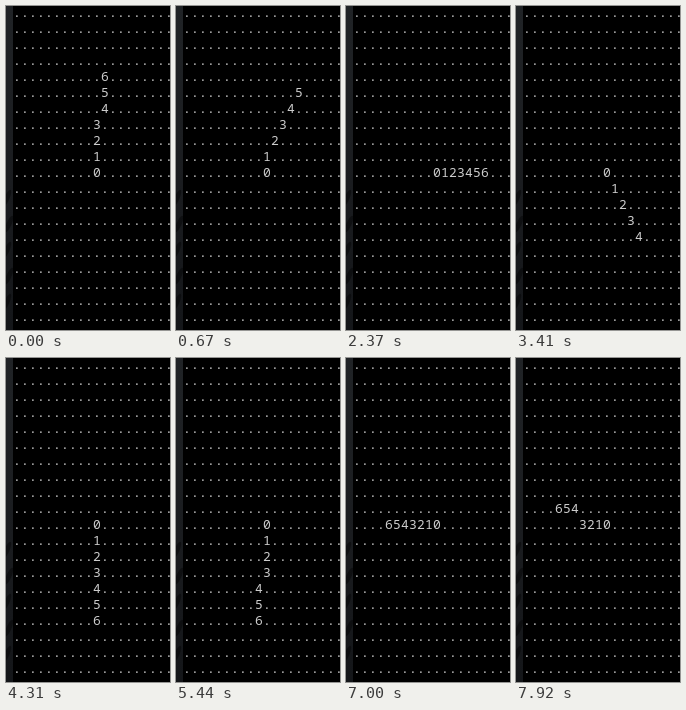
An HTML page with a canvas that plays this animation: 164 px wide and 324 px high, repeating every 8000 ms.

```html
<!DOCTYPE html>
<html lang="en">
<head>
<meta charset="utf-8">
<title>Rotating digit line</title>
<style>
  html, body { margin: 0; width: 100%; height: 100%; overflow: hidden; background: #000; }
  canvas { display: block; }
</style>
</head>
<body>
<canvas id="stage" width="164" height="324"></canvas>
<script>
const ctx = document.getElementById('stage').getContext('2d');
const LOOP = 8000;
const CELL_W = 8, CELL_H = 16, LEFT = 7, BASE = 11;
const COLS = 20, ROWS = 20, CENTER = 10;
const RADIUS = 7.38;
const BLINK = 139.8;

// The line's angle in degrees, clockwise from the right: [ms, angle]
const SWEEP = [
  [0, -72], [1700, -11.7], [2440, 11.7], [3410, 42], [4310, 78.4],
  [5290, 101.8], [6160, 138.5], [7000, 168.4], [LOOP, 194]
];

function angleAt(t) {
  const i = SWEEP.findIndex(([time]) => time > t);
  const [t0, a0] = SWEEP[i - 1], [t1, a1] = SWEEP[i];
  return (a0 + (a1 - a0) * (t - t0) / (t1 - t0)) * Math.PI / 180;
}

// Digits step along the longer axis and stop one cell before the end point
function digitCells(angle) {
  const dx = Math.round(RADIUS * Math.cos(angle));
  const dy = Math.round(RADIUS * Math.sin(angle));
  const n = Math.max(Math.abs(dx), Math.abs(dy));
  const cells = new Map();
  for (let i = 0; i < n; i++) {
    const col = CENTER + Math.trunc(dx * i / n);
    const row = CENTER + Math.trunc(dy * i / n);
    cells.set(row * COLS + col, i);
  }
  return cells;
}

function drawBackdrop() {
  ctx.fillStyle = '#000';
  ctx.fillRect(0, 0, 164, 324);
  const side = ctx.createLinearGradient(0, 0, 0, 324);
  side.addColorStop(0, '#202326');
  side.addColorStop(0.55, '#1a1c1f');
  side.addColorStop(1, '#141619');
  ctx.fillStyle = side;
  ctx.fillRect(0, 0, LEFT, 324);
  // Dark slanted smudges low on the side strip
  ctx.fillStyle = 'rgba(0, 0, 0, 0.4)';
  for (let i = 0; i < 5; i++) {
    ctx.beginPath();
    ctx.ellipse(1 + i % 2 * 2, 192 + i * 26, 2.5, 9, 0.4, 0, 2 * Math.PI);
    ctx.fill();
  }
}

function drawCursor() {
  ctx.fillStyle = '#f2f2f2';
  ctx.fillRect(LEFT, 26, CELL_W, 4);
  ctx.fillStyle = '#303030';
  ctx.fillRect(LEFT + 3, 26, 2, 1);
}

function render(t) {
  drawBackdrop();
  ctx.font = '13px "Noto Sans Mono", "DejaVu Sans Mono", monospace';
  ctx.textAlign = 'center';
  ctx.textBaseline = 'alphabetic';
  ctx.fillStyle = '#cccccc';
  const digits = digitCells(angleAt(t));
  for (let row = 0; row < ROWS; row++) {
    for (let col = 0; col < COLS; col++) {
      const glyph = digits.get(row * COLS + col) ?? '.';
      ctx.fillText(glyph, LEFT + (col + 0.5) * CELL_W, BASE + row * CELL_H);
    }
  }
  if (Math.floor(t / BLINK) % 2) drawCursor();
}

const start = performance.now();
function tick() {
  render((performance.now() - start) % LOOP);
  requestAnimationFrame(tick);
}
tick();
</script>
</body>
</html>
```
